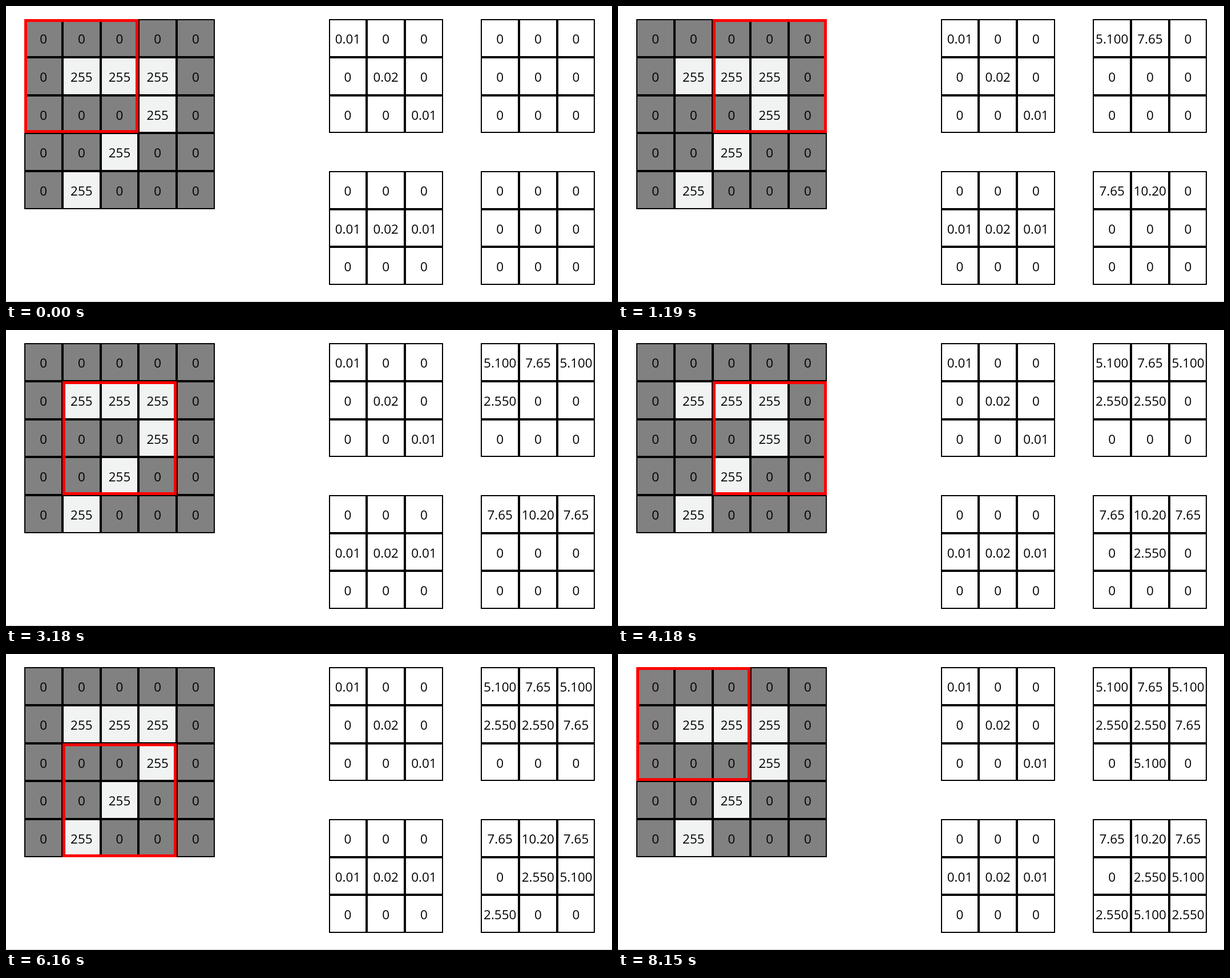
An HTML page for the animation above (8.35 s loop, 1062x520 px).

```html
<!DOCTYPE html>
<html lang="en">
<head>
<meta charset="utf-8">
<title>Convolution with two kernels</title>
<style>
  html, body { margin: 0; height: 100%; overflow: hidden; background: #fff; }
  svg { display: block; }
  text { font: 22.4px "Open Sans", "Noto Sans", sans-serif; text-anchor: middle; }
</style>
</head>
<body>
<svg id="stage" width="1062" height="520" viewBox="0 0 1062 520"></svg>
<script>
const stage = document.getElementById("stage");
const LOOP = 8350;
const PITCH = 200 / 3;

const matrix = (size, rule) => Array.from({ length: size }, (_, r) =>
  Array.from({ length: size }, (_, c) => rule(r, c)));

// A hand-drawn "7": a top bar and a falling diagonal.
const image = matrix(5, (r, c) =>
  c > 0 && c < 4 && (r === 1 || r + c === 5) ? 255 : 0);

// Each kernel weighs one line of cells, with a double centre.
const kernel = onLine => matrix(3, (r, c) =>
  onLine(r, c) ? (r === 1 && c === 1 ? 0.02 : 0.01) : 0);
const kernels = [kernel((r, c) => r === c), kernel(r => r === 1)];

// Cell edges snap to whole pixels.
const edgeX = col => Math.round(97 / 3 + col * PITCH);
const edgeY = row => Math.round(70 / 3 + row * PITCH);

// Steps are about 993.5 ms apart, on a 10 ms clock.
const stepTime = n => 200 + 10 * Math.round(99.35 * n);

function add(tag, attrs, text = "") {
  const el = document.createElementNS("http://www.w3.org/2000/svg", tag);
  for (const key in attrs) el.setAttribute(key, attrs[key]);
  el.textContent = text;
  return stage.appendChild(el);
}

function frame(col, row, span, line, stroke, fill) {
  const x = edgeX(col), y = edgeY(row);
  return add("rect", {
    x: x + line / 2, y: y + line / 2,
    width: edgeX(col + span) - x - line,
    height: edgeY(row + span) - y - line,
    "stroke-width": line, stroke, fill
  });
}

function cell(col, row, value, fill) {
  frame(col, row, 1, 2, "#000", fill);
  return add("text", {
    x: 97 / 3 + (col + 0.5) * PITCH,
    y: Math.round(199 / 3 + row * PITCH)
  }, value);
}

function grid(col, row, values, color = () => "#fff") {
  return values.flatMap((line, r) =>
    line.map((v, c) => cell(col + c, row + r, v, color(v))));
}

function convolve(weights, row, col) {
  let sum = 0;
  weights.forEach((line, r) => line.forEach((w, c) => {
    sum += image[row + r][col + c] * w;
  }));
  return String(sum).slice(0, 5);
}

grid(0, 0, image, v => v ? "#f1f3f2" : "#808180");
const outputs = kernels.map((weights, i) => {
  grid(8, 4 * i, weights);
  return {
    cells: grid(12, 4 * i, matrix(3, () => 0)),
    results: matrix(3, (r, c) => convolve(weights, r, c)).flat()
  };
});
add("rect", { x: 0, y: 519, width: 1062, height: 1, fill: "#ccc" });
const cursor = frame(0, 0, 3, 5, "#f00", "none");

function draw(now) {
  const t = now % LOOP;
  let done = 0;
  while (done < 9 && t >= stepTime(done)) done++;

  const pos = done % 9;
  cursor.setAttribute("x", edgeX(pos % 3) + 2.5);
  cursor.setAttribute("y", edgeY(Math.floor(pos / 3)) + 2.5);
  for (const { cells, results } of outputs)
    cells.forEach((el, n) => { el.textContent = n < done ? results[n] : "0"; });

  requestAnimationFrame(draw);
}
requestAnimationFrame(draw);
</script>
</body>
</html>
```
